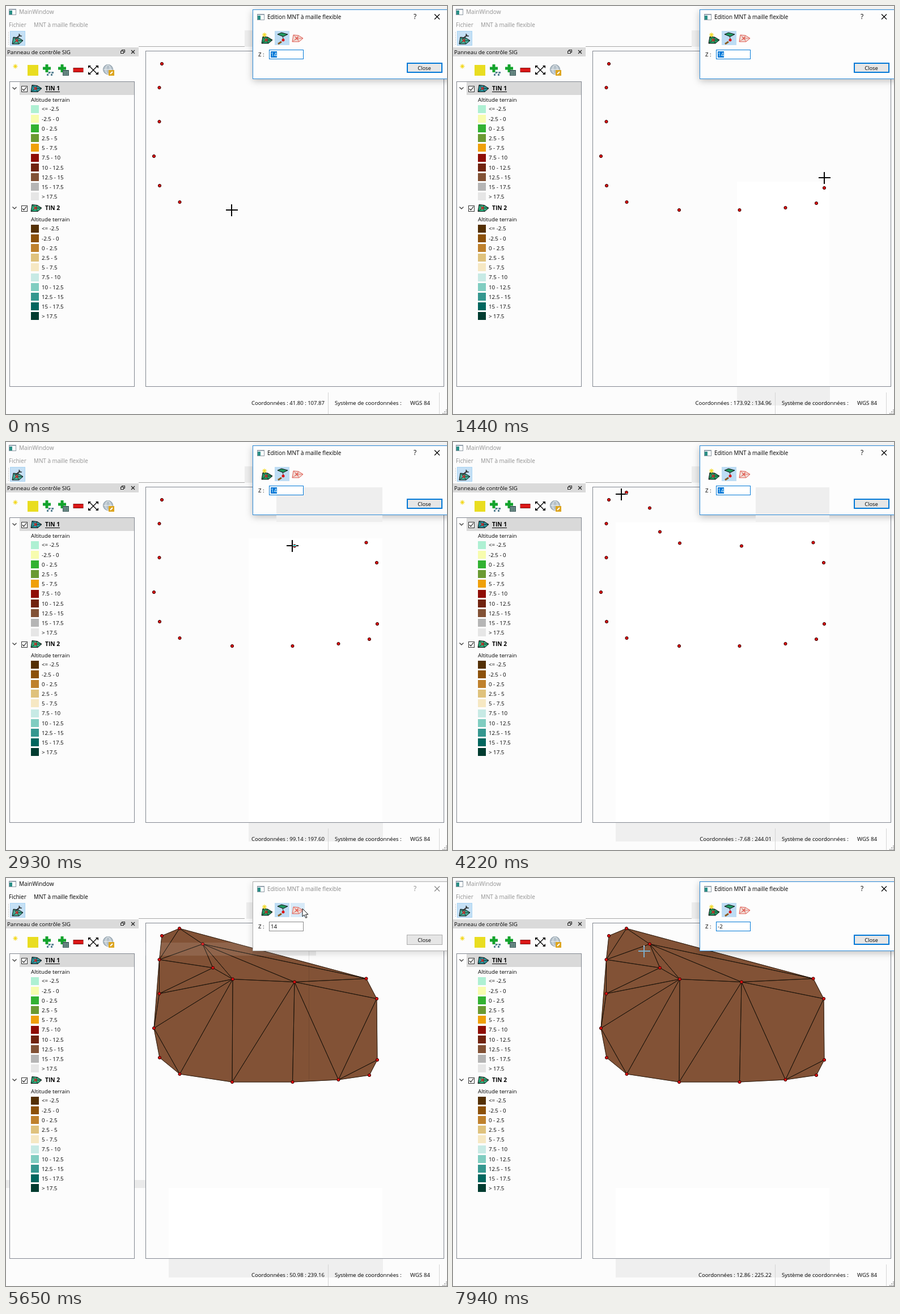
An HTML page with a canvas that plays this animation: 778x720 px, repeating every 8000 ms.

```html
<!DOCTYPE html>
<html lang="fr">
<head>
<meta charset="utf-8">
<title>MainWindow</title>
<style>
  html, body { margin: 0; width: 100%; height: 100%; overflow: hidden; background: #fcfcfc; }
  canvas { display: block; }
</style>
</head>
<body>
<canvas id="stage" width="778" height="720"></canvas>
<script>
const g = document.getElementById('stage').getContext('2d');
const LOOP = 8000;
const BUILD = 5650;   // the mesh appears
const REFOCUS = 6440; // the dialog is active again
const BG = '#fcfcfc', BLUE = '#0078d7', EDGE = '#828790', INK = '#000', DIM = '#929292';

// Survey points in the order they are clicked; six exist from the start
const PTS = [
  [275, 102], [270.5, 144], [270.5, 204], [261, 265], [271, 317], [306.5, 346],
  [399, 360], [505.5, 360], [586.5, 356], [641, 348], [655, 321],
  [654, 213], [635.5, 177.5], [509, 183.5], [400, 178.5], [365, 158.5], [347, 116.5], [306, 89]
];
const clickTime = i => i < 6 ? -1 : i < 11 ? 150 + (i - 6) * 285 : 2320 + (i - 11) * 285;

// Pointer stops besides the clicks: time, x, y
const EXIT = [412.6, 101.5];
const STOPS = [
  [-15, 394.5, 360.3], [0, 398, 360], [2030, 654, 110], [2120, 654, 213], [4170, 296.8, 92],
  [4490, ...EXIT], [5100, 523, 54], [5700, 523, 54], [6450, 443, 88], [7280, 443, 88], [7880, 337.4, 129]
];
const KEYS = PTS.map((p, i) => [clickTime(i), ...p]).slice(6).concat(STOPS).sort((a, b) => a[0] - b[0]);

// Spells of movement, refreshed about every 135 ms
const BURSTS = [[150, 1080], [1200, 2170], [2320, 3240], [3390, 4370], [4490, 5220], [BUILD, 6580], [7280, 7940]];

const CLASSES = Array.from({ length: 10 }, (_, i) => {
  const lo = i * 2.5 - 5, hi = lo + 2.5;
  return i === 0 ? `<= ${hi}` : i === 9 ? `> ${lo}` : `${lo} - ${hi}`;
});
const LAYERS = [
  { name: 'TIN 1', y: 145.5, on: true, icon: '#27949c',
    ramp: ['#aef0d3', '#f7fcae', '#32b232', '#6b9a33', '#efa00a', '#8f0d06', '#70230f', '#825236', '#b5b5b5', '#e6e6e6'] },
  { name: 'TIN 2', y: 356.5, icon: '#2cae7e',
    ramp: ['#543005', '#8c510a', '#bf812d', '#dfc27d', '#f6e8c3', '#c7eae5', '#80cdc1', '#35978f', '#01665e', '#003c30'] }
];

function rect(x, y, w, h, color) { g.fillStyle = color; g.fillRect(x, y, w, h); }

function frame(x, y, w, h, color, lw = 1) {
  g.strokeStyle = color; g.lineWidth = lw;
  g.strokeRect(x + lw / 2, y + lw / 2, w - lw, h - lw);
}

function trace(pts, closed) {
  g.beginPath();
  pts.forEach(p => g.lineTo(p[0], p[1]));
  if (closed) g.closePath();
}

function line(pts, color, lw = 1) {
  trace(pts); g.strokeStyle = color; g.lineWidth = lw; g.stroke();
}

function shape(pts, fill, stroke, lw = 1) {
  trace(pts, true);
  g.fillStyle = fill; g.fill();
  if (stroke) { g.strokeStyle = stroke; g.lineWidth = lw; g.stroke(); }
}

function disc(x, y, r, fill, stroke) {
  g.beginPath(); g.arc(x, y, r, 0, 7);
  g.fillStyle = fill; g.fill();
  if (stroke) { g.strokeStyle = stroke; g.lineWidth = 1; g.stroke(); }
}

// y is the middle of the capitals
function text(s, x, y, { size = 9.75, color = INK, weight = 400, align = 'left' } = {}) {
  g.font = `${weight} ${size}px "Open Sans", "Noto Sans", sans-serif`;
  g.textAlign = align; g.fillStyle = color;
  g.fillText(s, x, Math.round(y + 3.8));
}

function cross(x, y, r, color, lw = 1) {
  line([[x - r, y - r], [x + r, y + r]], color, lw);
  line([[x - r, y + r], [x + r, y - r]], color, lw);
}

function tin(x, y, fill, ink = '#111', core = '#d22') {
  const rim = [[-9, 6], [-7, -6], [2, -5], [10, 0], [3, 6]].map(p => [x + p[0], y + p[1]]);
  shape(rim, fill, ink);
  rim.forEach(p => line([[x - 1, y], p], ink, .8));
  cross(x - 1, y, 2.5, core, 1.4);
}

function star(x, y) {
  for (let i = 0; i < 4; i++) {
    const a = i * Math.PI / 4, c = 4 * Math.cos(a), s = 4 * Math.sin(a);
    line([[x - c, y - s], [x + c, y + s]], '#f3d81c', 1.2);
  }
}

function plus(x, y) {
  rect(x - 2.5, y - 7, 5, 14, '#12a32c');
  rect(x - 7, y - 2.5, 14, 5, '#12a32c');
}

function windowIcon(x, y) {
  rect(x, y, 13, 11, '#fff');
  rect(x, y, 13, 2, '#9aa9b8');
  rect(x + 1, y + 3, 5, 7, '#2a8f86');
  frame(x, y, 13, 11, '#8f9ba5');
}

function toolbar() {
  for (let y = 46; y < 70; y += 3) rect(4, y, 1, 1, '#aaa');
  rect(7, 44, 27, 26, '#c5e0f5');
  frame(7, 44, 27, 26, '#a8d3f3');
  tin(20, 61, '#3fae98');
  line([[17, 58], [25, 51]], '#333', 2);
  line([[23, 49], [24, 53], [28, 53]], '#333', 1.6);
  rect(234, 71, 187, 1, '#a8a8a8');
}

function panelTools() {
  star(16.5, 106.5);
  rect(38, 104, 19, 19, '#e9dd20');
  plus(72, 110);
  const nodes = [[73, 121], [76, 117], [82, 117], [80, 121]];
  line(nodes, '#5b8294');
  nodes.forEach(p => rect(p[0] - 1, p[1] - 1, 3, 3, '#547f91'));
  plus(99, 110);
  rect(100, 113, 11, 10, '#3f5c5c');
  for (let i = 0; i < 9; i++) rect(101.5 + i % 3 * 3, 115 + (i / 3 | 0) * 2.6, 2, 1.5, '#9bc0b5');
  rect(118.5, 109, 18, 8, '#7a1010');
  rect(119, 110, 17, 6, '#dc1717');
  cross(154, 113, 7, INK, 1.3);
  for (const i of [-1, 1]) for (const j of [-1, 1]) {
    const x = 154 + i * 9, y = 113 + j * 8;
    shape([[x, y], [x - i * 5, y], [x, y - j * 5]], INK);
  }
  disc(180, 112, 8.5, '#b5c1ca', '#8294a1');
  line([[172, 112], [188, 112]], '#eef2f4');
  g.beginPath(); g.ellipse(180, 112, 4, 8, 0, 0, 7); g.stroke();
  rect(181, 113, 10, 10, '#dda51f');
  line([[184, 120], [188, 116]], '#fff', 2);
}

function layer({ name, y, on, icon, ramp }) {
  if (on) rect(24, 134, 202, 23, '#d9d9d9');
  line([[11.5, y - 2], [15, y + 1.5], [18.5, y - 2]], '#333', 1.2);
  rect(27, y - 4.5, 11, 11, '#fff');
  frame(27, y - 4.5, 11, 11, '#333');
  line([[29, y + 1], [31.5, y + 3.5], [36, y - 2.5]], '#222', 1.2);
  tin(53, y, icon);
  text(name, 69, y, { size: 10.2, weight: 700 });
  if (on) rect(69, y + 5.5, 26, 1, INK);
  text('Altitude terrain', 44, y + 19.5);
  CLASSES.forEach((s, i) => {
    const cy = y + 36 + i * 17.2;
    rect(44, Math.round(cy - 7), 14, 14, ramp[i]);
    text(s, 63, cy);
  });
}

function mainWindow(active) {
  const ink = active ? INK : DIM;
  rect(0, 0, 778, 720, BG);
  windowIcon(5, 5);
  text('MainWindow', 23, 10.5, { size: 10.1, color: ink });
  text('Fichier', 5, 33, { size: 10, color: ink });
  text('MNT à maille flexible', 49, 33, { size: 9.9, color: ink });
  toolbar();
  rect(0, 73, 234, 16, '#dadada');
  text('Panneau de contrôle SIG', 2, 81);
  frame(204, 77, 6, 5, '#222');
  rect(202, 79, 6, 5, '#dadada');
  frame(202, 79, 6, 5, '#222');
  cross(224, 81, 3, '#222', 1.3);
  panelTools();
  frame(6, 133, 221, 539, EDGE);
  LAYERS.forEach(layer);
}

// The map area brightens and the bar below greys wherever it was redrawn
function repaints(t) {
  const done = [[BUILD, 287, 547], [3390, 287, 142], [2320, 428, 170], [1200, 501, 310]].find(s => t >= s[0]);
  if (!done) return;
  const [, x, y] = done;
  rect(x, y, 664 - x, 671 - y, '#fff');
  rect(x, 672, 665 - x, 33, '#efefef');
}

function statusBar(coords) {
  text('Coordonnées : ' + coords, 562, 700.5, { size: 9.55, align: 'right' });
  text('Système de coordonnées :', 580, 700.5, { size: 9.6 });
  text('WGS 84', 713, 700.5);
  rect(568, 682, 1, 38, '#d5d5d5');
  rect(764, 682, 1, 38, '#d5d5d5');
  for (let i = 0; i < 3; i++) for (let j = 0; j <= i; j++) rect(776 - j * 3, 712 + i * 3, 2, 2, '#b5b5b5');
}

function circumcircle([ax, ay], [bx, by], [cx, cy]) {
  const ux = bx - ax, uy = by - ay, vx = cx - ax, vy = cy - ay;
  const d = 2 * (ux * vy - uy * vx), u = ux * ux + uy * uy, v = vx * vx + vy * vy;
  const x = (vy * u - uy * v) / d, y = (ux * v - vx * u) / d;
  return { x: ax + x, y: ay + y, r: Math.hypot(x, y) };
}

// Delaunay: keep the triangles whose circumcircle holds no other point
function triangulate(pts) {
  const out = [];
  pts.forEach((a, i) => pts.slice(i + 1).forEach((b, j) => pts.slice(i + j + 2).forEach(c => {
    const o = circumcircle(a, b, c);
    const empty = pts.every(p => p === a || p === b || p === c || Math.hypot(p[0] - o.x, p[1] - o.y) > o.r);
    if (empty) out.push([a, b, c]);
  })));
  return out;
}
const MESH = triangulate(PTS);

function mesh() {
  g.lineJoin = 'round';
  MESH.forEach(tri => shape(tri, '#825236', '#825236'));
  MESH.forEach(tri => { trace(tri, true); g.strokeStyle = '#151008'; g.lineWidth = .8; g.stroke(); });
  g.lineJoin = 'miter';
}

function points(t) {
  PTS.forEach(([x, y], i) => { if (t >= clickTime(i)) disc(x, y, 2.6, '#e01010', '#300'); });
}

// Window that fades away once the mesh is built
function ghost() {
  g.globalAlpha = .07;
  rect(227, 533, 19, 14, INK);
  rect(0, 533, 6, 14, INK);
  g.beginPath(); g.roundRect(435, 107, 112, 30, [0, 12, 0, 0]); g.fill();
  g.globalAlpha = .1;
  rect(246, 114, 288, 23, '#fff');
  line([[534.5, 114], [534.5, 356]], INK);
  g.globalAlpha = .25;
  frame(473, 121, 8, 8, '#777');
  cross(515, 125, 4, '#777');
  g.globalAlpha = 1;
}

function dialogBody(active, t) {
  const left = active ? 421 : 424;
  rect(left, 43, 435 - left, 29, 'rgba(0,0,0,.06)');
  g.save();
  g.shadowColor = `rgba(0,0,0,${active ? .26 : .16})`;
  g.shadowBlur = 12; g.shadowOffsetY = 3;
  rect(435, 6, 360, 123, '#fdfdfd');
  g.restore();
  if (t >= 2320 && t < BUILD) {
    const x = t < 3390 ? 477 : 534;
    rect(x, 80, 664 - x, 61, '#eeeeee');
  }
  frame(435, 6, 360, 123, active ? '#2b8ad8' : '#b0b0b0');
}

function dialog(active, hover, t) {
  const edge = active ? BLUE : '#8a8a8a', ink = active ? INK : '#888';
  const selected = t < BUILD || (t >= 6730 && t < 7000);
  dialogBody(active, t);
  windowIcon(443, 14);
  text('Edition MNT à maille flexible', 461, 19.5, { size: 9.9, color: ink });
  text('?', 721.5, 19, { size: 12, color: ink, align: 'center' });
  cross(760.5, 19, 4.5, ink, 1.2);

  tin(460, 60, '#1f9a62');
  star(456, 51);
  rect(474, 44, 26, 25, '#bddcf4');
  shape([[479, 50], [486, 47], [497, 50], [489, 54]], '#1f9a62', '#111');
  line([[488, 54], [490, 60]], '#333');
  disc(489, 60, 2.5, '#d11');
  line([[486, 63], [480, 67]], '#8a5a20', 3);
  if (hover) rect(502, 44, 25, 25, '#d8eaf8');
  tin(514, 57, '#f0dcd6', '#e05a50', '#e05a50');

  text('Z :', 445, 85.5);
  rect(464, 77, 61, 17, '#fff');
  frame(464, 77, 61, 17, edge);
  if (selected) rect(467, 80, 11, 11, BLUE);
  text(t < 7000 ? '14' : t < 7280 ? '-' : '-2', 467, 85.5, { color: selected ? '#fff' : INK });
  rect(707, 100, 63, 18, '#e6e6e6');
  frame(707, 100, 63, 18, active ? BLUE : '#adadad', active ? 2 : 1);
  text('Close', 738, 109.5, { size: 9.4, align: 'center' });
}

function arrow(x, y) {
  const tip = [[0, 0], [0, 14], [3.2, 11], [5.8, 16.5], [8, 15.5], [5.6, 10.3], [10, 10.2]];
  shape(tip.map(p => [x + p[0], y + p[1]]), '#fff', '#111');
}

// Inverts what lies below it
function crosshair(x, y) {
  g.globalCompositeOperation = 'difference';
  g.beginPath();
  g.rect(x - 10, y - 1, 21, 2);
  g.rect(x - 1, y - 10, 2, 21);
  g.fillStyle = '#fff'; g.fill();
  g.globalCompositeOperation = 'source-over';
}

// Time of the pose held at t
function snap(t) {
  const burst = BURSTS.findLast(b => b[0] <= t);
  if (!burst) return 0;
  const [a, b] = burst, n = Math.round((b - a) / 135), d = (b - a) / n;
  const i = Math.min(n, Math.floor((t - a) / d + .4));
  return i ? a + (i - .4) * d : a;
}

function pointer(t) {
  const i = KEYS.findLastIndex(k => k[0] <= t);
  const [ta, xa, ya] = KEYS[i], [tb, xb, yb] = KEYS[i + 1] || KEYS[i];
  const k = tb > ta ? (t - ta) / (tb - ta) : 0, e = k * k * (3 - 2 * k);
  return [xa + (xb - xa) * e, ya + (yb - ya) * e];
}

const inDialog = ([x, y]) => x > 434 && y < 129;

// Map coordinates, trailing the pointer slightly and frozen once it has left the map
function readout(t, pos) {
  const [x, y] = t > 4490 && inDialog(pos) ? EXIT : pointer(t - 15);
  return `${((x - 312.1) * .5073).toFixed(2)} : ${((572.94 - y) * .5073).toFixed(2)}`;
}

function draw(t) {
  const pose = snap(t), pos = pointer(pose), [x, y] = pos.map(Math.round);
  const built = t >= BUILD, active = !built || t >= REFOCUS;
  const hover = x > 501 && x < 527 && y > 43 && y < 70;
  mainWindow(!active);
  repaints(t);
  frame(246, 79, 527, 593, EDGE);
  if (built) mesh();
  points(pose);
  statusBar(readout(pose, pos));
  if (built && t < BUILD + 120) ghost();
  dialog(active, hover, t);
  (inDialog(pos) ? arrow : crosshair)(x, y);
}

const start = performance.now();
function tick() {
  draw((performance.now() - start) % LOOP);
  requestAnimationFrame(tick);
}
tick();
</script>
</body>
</html>
```
